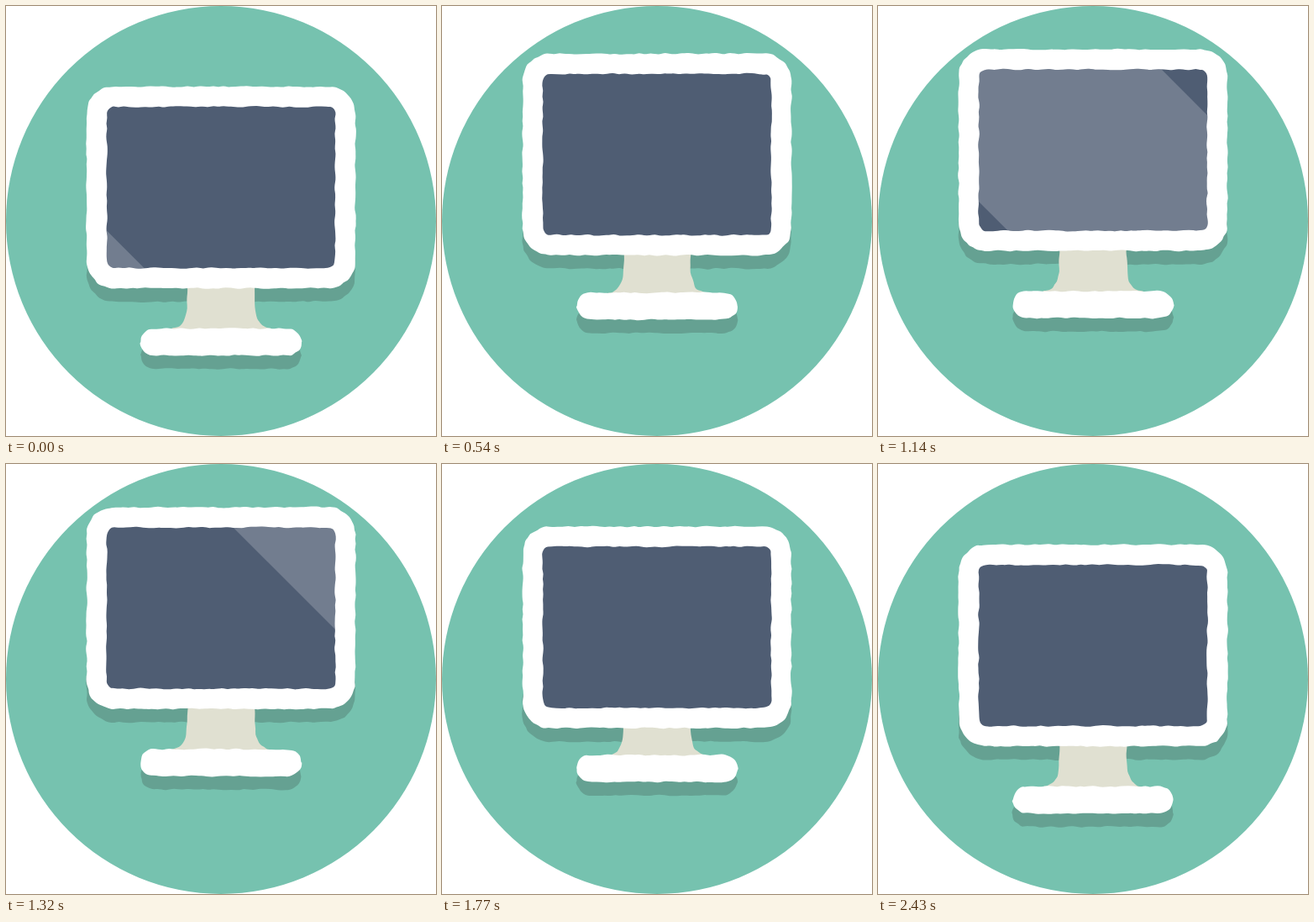
An HTML page with a canvas for the animation above (2.46 s loop, 512 by 512 pixels).

```html
<!DOCTYPE html>
<html lang="en">
<head>
<meta charset="utf-8">
<title>Bouncing monitor</title>
<style>
  html, body { margin: 0; width: 100%; height: 100%; overflow: hidden; background: #fff; }
  canvas { display: block; width: 512px; height: 512px; }
</style>
</head>
<body>
<canvas id="stage" width="512" height="512"></canvas>
<script>
const ctx = document.getElementById('stage').getContext('2d');
const LOOP = 2460, STEP = 30, RISE = 44.5;
const GREEN = '#76c2af', SHADOW = 'rgba(35,31,32,.2)', NECK = '#e0e0d1';
const SCREEN = '#4f5d73', SHINE = 'rgba(255,255,255,.2)';

const bez = (a, b, s) => 3 * (1 - s) ** 2 * s * a + 3 * (1 - s) * s * s * b + s ** 3;

// Progress from t0 to t1 along a CSS-style cubic Bézier.
function ease(t, t0, t1, x1 = 1 / 3, y1 = 0, x2 = 2 / 3, y2 = 1) {
  const u = Math.min(1, Math.max(0, (t - t0) / (t1 - t0)));
  let lo = 0, hi = 1;
  for (let i = 0; i < 20; i++) {
    const mid = (lo + hi) / 2;
    if (bez(x1, x2, mid) < u) lo = mid; else hi = mid;
  }
  return bez(y1, y2, (lo + hi) / 2);
}

function random(seed) {
  return () => {
    seed = (seed + 0x6d2b79f5) | 0;
    let r = Math.imul(seed ^ (seed >>> 15), 1 | seed);
    r = (r + Math.imul(r ^ (r >>> 7), 61 | r)) ^ r;
    return ((r ^ (r >>> 14)) >>> 0) / 4294967296;
  };
}

function roundRect(x, y, w, h, r) {
  const pts = [];
  const side = (x0, y0, x1, y1) => {
    const n = Math.max(1, Math.round(Math.hypot(x1 - x0, y1 - y0) / 6));
    for (let i = 0; i < n; i++) pts.push([x0 + (x1 - x0) * i / n, y0 + (y1 - y0) * i / n]);
  };
  const corner = (cx, cy, from) => {
    const n = Math.max(3, Math.round(r * 1.57 / 5));
    for (let i = 0; i < n; i++) {
      const a = from + Math.PI / 2 * i / n;
      pts.push([cx + r * Math.cos(a), cy + r * Math.sin(a)]);
    }
  };
  const R = x + w, B = y + h;
  side(x + r, y, R - r, y);
  corner(R - r, y + r, -Math.PI / 2);
  side(R, y + r, R, B - r);
  corner(R - r, B - r, 0);
  side(R - r, B, x + r, B);
  corner(x + r, B - r, Math.PI / 2);
  side(x, B - r, x, y + r);
  corner(x + r, y + r, Math.PI);
  return pts;
}

function neckShape() {
  const left = [[216, 322], [216, 330], [216, 338], [216, 345]];
  for (let s = 0; s <= 1; s += 0.125) {
    left.push([216 - 20 * bez(0, 0.35, s), 352 + 32 * bez(0.69, 1, s)]);
  }
  left.push([196, 392]);
  return [...left, ...left.map(([x, y]) => [512 - x, y]).reverse()];
}

const shapes = {
  frameShadow: roundRect(96, 270, 320, 82, 32),
  baseShadow: roundRect(160, 400, 192, 32, 16),
  neck: neckShape(),
  base: roundRect(160, 384, 192, 32, 16),
  frame: roundRect(96, 96, 320, 240, 32),
  screen: roundRect(120, 120, 272, 192, 8)
};

// Closed smooth outline with slightly jittered points.
function roughPath(pts, dy, seed) {
  const rnd = random(seed);
  const p = pts.map(([x, y]) => [x + (rnd() - 0.5) * 2, y + dy + (rnd() - 0.5) * 2]);
  const mid = (a, b) => [(a[0] + b[0]) / 2, (a[1] + b[1]) / 2];
  ctx.beginPath();
  ctx.moveTo(...mid(p[p.length - 1], p[0]));
  p.forEach((a, i) => ctx.quadraticCurveTo(...a, ...mid(a, p[(i + 1) % p.length])));
  ctx.closePath();
}

function draw(t) {
  const baseY = -RISE * (ease(t, 0, 615) - ease(t, 1500, 2200, 0.7, 0.1, 0.85, 0.95));
  const frameY = -RISE * (ease(t, 210, 630) - ease(t, 1500, 2170, 0.4, 0.15, 0.4, 1));
  let seed = Math.round(t / STEP) * 101 + 7;
  const fill = (name, dy, color) => {
    roughPath(shapes[name], dy, seed++);
    ctx.fillStyle = color;
    ctx.fill();
  };

  ctx.clearRect(0, 0, 512, 512);
  ctx.fillStyle = GREEN;
  ctx.beginPath();
  ctx.arc(256, 256, 256, 0, 7);
  ctx.fill();

  fill('frameShadow', frameY, SHADOW);
  fill('baseShadow', baseY, SHADOW);
  fill('neck', baseY, NECK);
  fill('base', baseY, '#fff');
  fill('frame', frameY, '#fff');
  fill('screen', frameY, SCREEN);

  // Diagonal shine, clipped to the screen outline.
  const x = -335 + 838 * ease(t, 810, 1480);
  ctx.save();
  ctx.clip();
  ctx.fillStyle = SHINE;
  ctx.beginPath();
  ctx.moveTo(x - 187.5, 0);
  ctx.lineTo(x + 187.5, 0);
  ctx.lineTo(x + 699.5, 512);
  ctx.lineTo(x + 324.5, 512);
  ctx.fill();
  ctx.restore();
}

const start = performance.now();
function tick() {
  const t = (performance.now() - start) % LOOP;
  draw(Math.floor(t / STEP) * STEP);
  requestAnimationFrame(tick);
}
tick();
</script>
</body>
</html>
```
